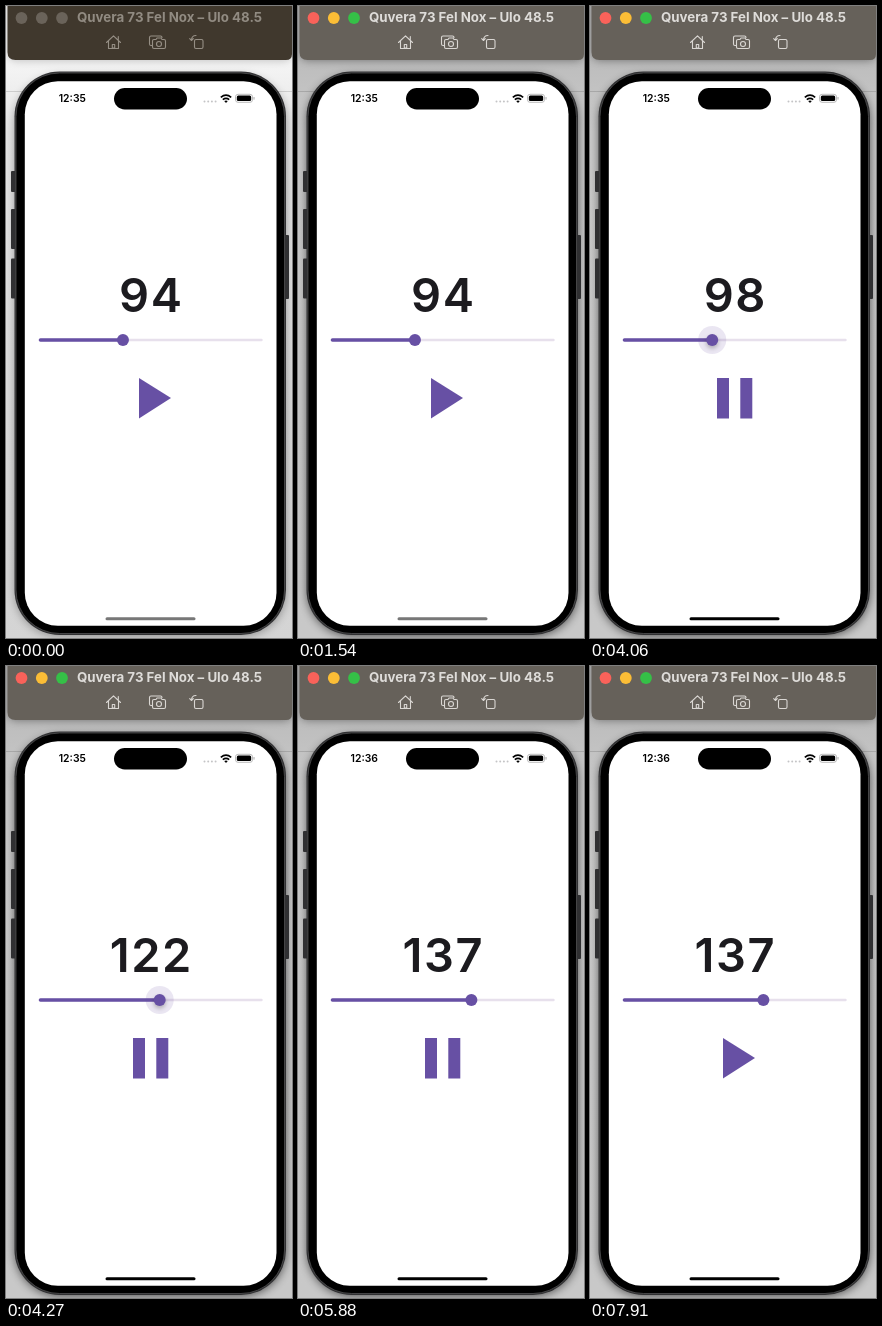
Recreate the animation shown at these times as an HTML page. Size 286x632 px, loop 9030 ms.

```html
<!DOCTYPE html>
<html lang="en">
<head>
<meta charset="utf-8">
<title>Tempo slider</title>
<style>
  html, body { margin: 0; width: 100%; height: 100%; overflow: hidden; }
  svg { display: block; width: 286px; height: 632px; font-family: Inter, sans-serif; }
  .wall { --hi: #f6f6f6; --mid: #e4e4e4; --low: #d4d4d4; }
  .bar { fill: #40382d; }
  .title { fill: #918b82; font-weight: 700; font-size: 13.3px; }
  .icons { stroke: #968f85; fill: none; stroke-width: 1.1; stroke-linejoin: round; stroke-linecap: round; }
  .lights circle { fill: #6a635a; }
  .shade { opacity: .35; }
  .active .wall { --hi: #bcbcbc; --mid: #cacaca; --low: #c8c8c8; }
  .active .bar { fill: #66615a; }
  .active .title { fill: #dedcd9; }
  .active .icons { stroke: #dad7d3; }
  .active .shade { opacity: .6; }
  .active .lights :nth-child(1) { fill: #f9625a; }
  .active .lights :nth-child(2) { fill: #fbbd36; }
  .active .lights :nth-child(3) { fill: #35c047; }
  .accent { fill: #6750a4; }
</style>
</head>
<body>
<svg id="stage" viewBox="0 0 286 632">
  <defs>
    <linearGradient id="wall" class="wall" x2="0" y2="1">
      <stop offset=".08" style="stop-color:var(--hi)"/>
      <stop offset=".2" style="stop-color:var(--mid)"/>
      <stop offset="1" style="stop-color:var(--low)"/>
    </linearGradient>
    <filter id="blur" x="-20%" y="-20%" width="140%" height="140%"><feGaussianBlur stdDeviation="5"/></filter>
    <filter id="soft" x="-50%" y="-50%" width="200%" height="200%"><feGaussianBlur stdDeviation="2"/></filter>
  </defs>

  <rect width="286" height="632" fill="url(#wall)"/>
  <path d="M0 85.500H286" stroke="#000" stroke-opacity=".14"/>
  <g class="shade" filter="url(#blur)">
    <rect x="2" y="-10" width="284" height="64" rx="8" opacity=".7"/>
    <rect x="9" y="70" width="271" height="560" rx="45"/>
  </g>

  <path class="bar" d="M1.500 0H286V48q0 6-6 6H9.500q-8 0-8-8Z"/>
  <g class="lights">
    <circle cx="15.500" cy="12" r="5.900"/><circle cx="35.800" cy="12" r="5.900"/><circle cx="56" cy="12" r="5.900"/>
  </g>
  <text class="title" x="71" y="16.400">Quvera 73 Fel Nox – Ulo 48.5</text>
  <g class="icons">
    <path d="M100.500 36.500L107.500 29.800L114.500 36.500M102.500 35V42.500H112.500V35M112.300 33.500V30.500"/>
    <path d="M106.300 42V38.500h2.400V42Z"/>
    <path d="M146 39.500h-1q-1.500 0-1.500-1.500v-6.500q0-1.500 1.500-1.500h9.500q1.500 0 1.500 1.500M148 33.500h2l1-1.500h4l1 1.500h2q1.500 0 1.500 1.500v6q0 1.500-1.500 1.500h-10q-1.500 0-1.500-1.500v-6q0-1.500 1.500-1.500"/>
    <circle cx="153" cy="38" r="2.500"/>
    <rect x="188.500" y="33.500" width="8.500" height="9" rx="1.500"/>
    <path d="M190 29.500q-4.500 0-4.500 5M183.700 32.700l1.800 1.800l1.800-1.800"/>
  </g>

  <g fill="#303032">
    <rect x="5" y="165" width="5" height="21" rx="1"/>
    <rect x="5" y="203" width="5" height="40" rx="1"/>
    <rect x="5" y="252.500" width="5" height="40" rx="1"/>
    <rect x="278" y="229" width="5" height="64" rx="1"/>
    <rect x="8.500" y="65.500" width="271.500" height="563.500" rx="45"/>
  </g>
  <rect x="10" y="67" width="268.500" height="560.500" rx="43.500" stroke="#59595b" stroke-width=".7"/>
  <rect x="12" y="69" width="264.500" height="556.500" rx="41.500"/>
  <rect x="18.800" y="75.300" width="251.700" height="544.400" rx="33" fill="#fff"/>

  <rect x="108" y="82" width="73" height="21.500" rx="10.750"/>
  <text id="clock" x="66.300" y="96.300" text-anchor="middle" font-size="10.400" font-weight="600"></text>
  <path d="M198.500 95.500h12" stroke="#c4c4c6" stroke-width="2" stroke-linecap="round" stroke-dasharray="0 3.700"/>
  <path d="M214.800 91.300q5.200-4.200 10.400 0M216.800 93.600q3.200-2.500 6.400 0" fill="none" stroke="#000" stroke-width="1.700"/>
  <path d="M218.200 95q1.800-1.200 3.600 0L220 96.900Z"/>
  <rect x="229.500" y="88.300" width="17" height="8" rx="2.500" fill="none" stroke="#aaa" stroke-width=".8"/>
  <rect x="230.800" y="89.500" width="14.400" height="5.600" rx="1.500"/>
  <path d="M248 91v2.600" stroke="#aaa"/>

  <text id="tempo" x="145.300" y="306" text-anchor="middle" font-size="47" font-weight="600" letter-spacing="1.500" fill="#1c1b1f"></text>

  <path d="M34 334H255.500" stroke="#e7e0ec" stroke-width="2.400" stroke-linecap="round"/>
  <path id="track" stroke="#6750a4" stroke-width="3.600" stroke-linecap="round"/>
  <circle id="halo" class="accent" cy="334" opacity=".14"/>
  <circle id="shadow" cy="336.500" r="6" filter="url(#soft)"/>
  <circle id="thumb" class="accent" cy="334" r="6"/>

  <circle id="ripple" class="accent" cx="143" cy="391.500" r="40"/>
  <path id="button" class="accent"/>
  <rect id="home" x="99.500" y="611.300" width="90" height="3" rx="1.500"/>
</svg>
<script>
const LOOP = 9030, STEP = 70;
const PLAY = "M133 372L165 392L133 412.500Z";
const PAUSE = "M127 372h12v40.500h-12ZM150.300 372h12v40.500h-12Z";
const $ = id => document.getElementById(id);
const set = (id, attrs) => { for (const k in attrs) $(id).setAttribute(k, attrs[k]); };
const ramp = (t, a, b) => Math.min(1, Math.max(0, (t - a) / (b - a)));
const smooth = s => s * s * (3 - 2 * s);

function rippleAt(t) {
  if (t >= 2590 && t < 2730) return t < 2660 ? .5 : 1;
  if (t >= 7140 && t < 7630) return t < 7210 ? .5 : (1 - ramp(t, 7210, 7630)) ** 2;
  return 0;
}

function draw(t) {
  const tempo = Math.round(94 + 43 * smooth(ramp(t, 3960, 4480)));
  const x = 33 + (tempo - 30) / 170 * 223;
  const press = ramp(t, 3780, 3990) * (1 - ramp(t, 4480, 4620));
  $("stage").classList.toggle("active", t >= 1540);
  $("clock").textContent = t < 4900 ? "12:35" : "12:36";
  $("tempo").textContent = tempo;
  set("track", { d: `M34.500 334H${x}` });
  set("thumb", { cx: x });
  set("halo", { cx: x, r: 14 * press });
  set("shadow", { cx: x, opacity: .25 * press });
  set("ripple", { opacity: .14 * rippleAt(t) });
  set("button", { d: t >= 2660 && t < 7210 ? PAUSE : PLAY });
  set("home", { fill: t < 2590 ? "#777" : "#000" });
}

const start = performance.now();
(function tick() {
  const t = (performance.now() - start) % LOOP;
  draw(Math.floor(t / STEP) * STEP);
  requestAnimationFrame(tick);
})();
</script>
</body>
</html>
```
